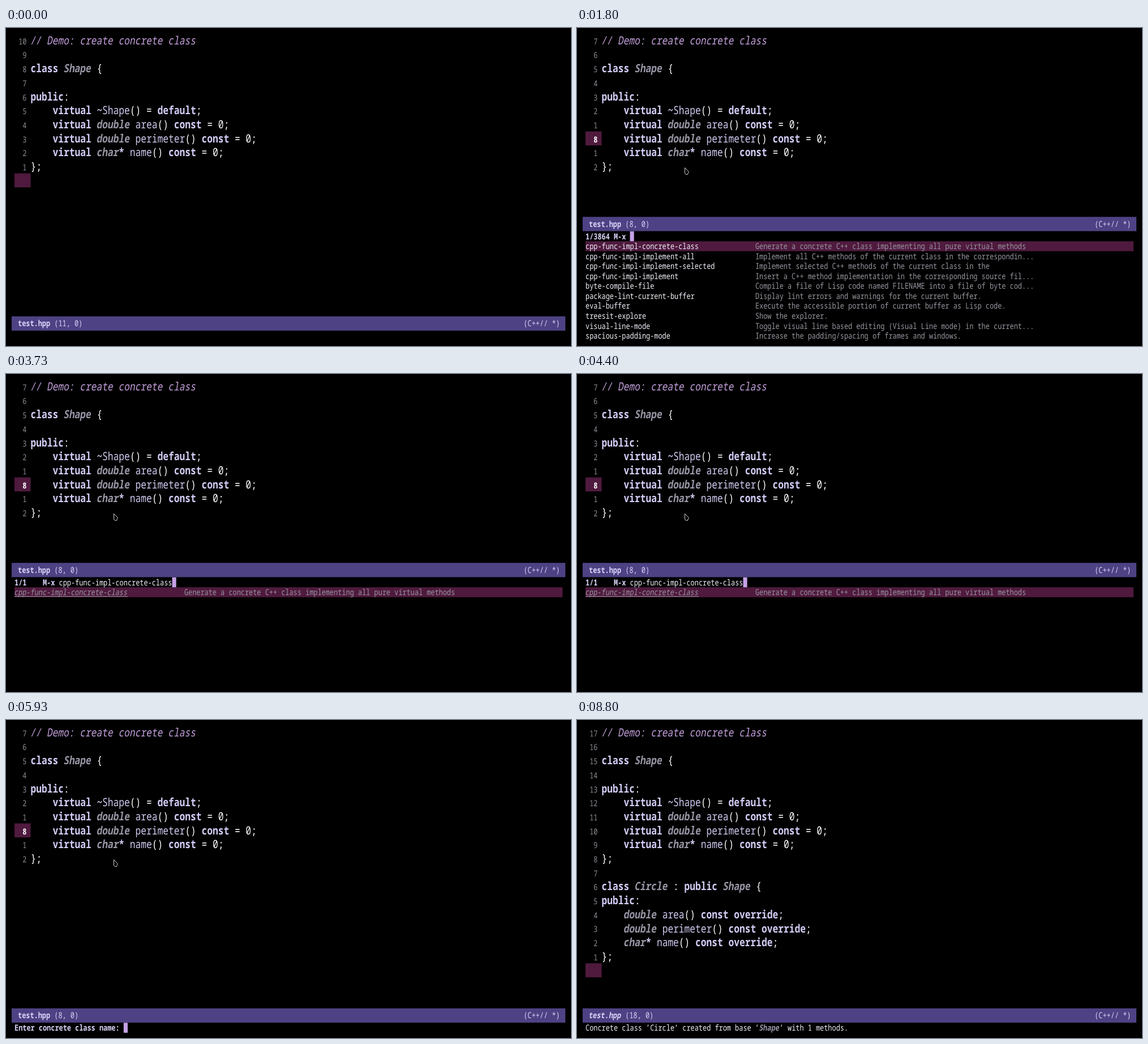
An HTML page for the animation above (9.87 s loop, 998 px wide and 561 px high).

```html
<!DOCTYPE html>
<html lang="en">
<head>
<meta charset="utf-8">
<title>Create concrete class</title>
<style>
  html, body { margin: 0; width: 100%; height: 100%; overflow: hidden; background: #000; }
  svg { display: block; width: 998px; height: 561px; }
  text {
    font-family: "Noto Sans Mono", "DejaVu Sans Mono", monospace;
    white-space: pre; text-rendering: geometricPrecision; fill: #f2f0fa;
  }
  .code { font-size: 20px; }
  .small { font-size: 14.66px; }
  .comment { fill: #c4a0dc; }
  .keyword { fill: #d2cdf6; font-weight: 600; }
  .type { fill: #9996a6; font-weight: 600; }
  .name { fill: #cfcbf0; }
  .sign { fill: #fff; font-weight: 500; }
  .number { fill: #8e8c96; }
  .current { fill: #fff; font-weight: 700; }
  .mode { fill: #d9d4f8; }
  .bold { font-weight: 600; }
  .prompt { fill: #d6d1f6; font-weight: 600; }
  .doc, .used { fill: #98959f; }
  .under { fill: #000; }
</style>
</head>
<body>
<svg id="stage" viewBox="0 0 998 561"></svg>
<script>
const LOOP = 9870;
const ASPECT = 0.8117;                 // the typeface is condensed throughout
const SLANT = 9.4, SLANTED = /comment|type|used|italic/;
const WIDTH = { code: 9.74, small: 7.14 };
const CODE_X = 43.5, MINI_X = 15;
const LINE_H = 24.68, MINI_H = 17.55;
const WINE = '#4f1a3e', CURSOR = '#c5a2e9', BAR = '#4e4284';

const stage = document.getElementById('stage');
const layers = [];

const lineTop = row => 9.7 + LINE_H * (row - 1);
const miniTop = row => 358.7 + MINI_H * row;

const rect = (x, y, w, h, fill) =>
  `<rect x="${x}" y="${y}" width="${w}" height="${h}" fill="${fill}"/>`;

// Sets runs of [string, class] one after another on the character grid.
function text(size, x, y, runs) {
  let out = '';
  for (const [s, cls = ''] of runs) {
    const slant = SLANTED.test(cls);
    const skew = slant ? `skewX(${-SLANT})` : '';
    out += `<text class="${size} ${cls}" transform="translate(${x - (slant ? 0.8 : 0)} ${y}) ` +
      `${skew} scale(${ASPECT} 1)">${s}</text>`;
    x += s.length * WIDTH[size];
  }
  return out;
}

const small = (x, y, ...runs) => text('small', x, y, runs);
const miniAt = (row, col, ...runs) =>
  small(MINI_X + col * WIDTH.small, miniTop(row) + 13.9, ...runs);
const mini = (row, ...runs) => miniAt(row, 0, ...runs);
const miniCursor = (row, col) =>
  rect(MINI_X + col * WIDTH.small, miniTop(row), WIDTH.small, MINI_H, CURSOR);

function layer(from, to, markup) {
  const g = document.createElementNS('http://www.w3.org/2000/svg', 'g');
  g.innerHTML = markup;
  stage.append(g);
  layers.push({ g, from, to });
  return g;
}

function wordClass(word, before) {
  if (/^(class|public|virtual|default|const|override|\*|~)$/.test(word)) return 'keyword';
  if (/^(double|char|Shape|Circle)$/.test(word) && before !== '~') return 'type';
  return /^[a-z]/i.test(word) ? 'name' : 'sign';
}

function highlight(line) {
  if (line.startsWith('//')) return [[line, 'comment']];
  const words = line.match(/\w+|[~*]|[^\w~*]+/g) || [];
  return words.map((word, i) => [word, wordClass(word, words[i - 1])]);
}

const codeLines = (lines, first) => lines.map((line, i) =>
  text('code', CODE_X, lineTop(first + i) + 19.3, highlight(line))).join('');

const base = `// Demo: create concrete class

class Shape {

public:
    virtual ~Shape() = default;
    virtual double area() const = 0;
    virtual double perimeter() const = 0;
    virtual char* name() const = 0;
};`.split('\n');

const derived = `class Circle : public Shape {
public:
    double area() const override;
    double perimeter() const override;
    char* name() const override;
};`.split('\n');

function gutter(current, rows) {
  let out = rect(MINI_X, lineTop(current), 28.5, LINE_H, WINE);
  for (let row = 1; row <= rows; row++) {
    const here = row === current;
    const label = String(here ? row : Math.abs(row - current));
    out += small(36.5 - label.length * WIDTH.small, lineTop(row) + 19.1,
      [label, here ? 'current' : 'number']);
  }
  return out;
}

function modeLine(top, row, modified) {
  const y = top + 17.7;
  return rect(10, top, 978, 25.2, BAR) +
    small(21, y, ['test.hpp', 'mode bold' + (modified ? ' italic' : '')], [` (${row}, 0)`, 'mode']) +
    small(914.2, y, ['(C++// *)', 'mode']);
}

const LOW = 508.7, HIGH = 333.2;
const OPEN = 1800, PICK = 3670, ASK = 4470, DONE = 6800;

// from, to, current line, mode line top
[
  [0, 1200, 11, LOW],
  [1200, 1330, 10, LOW],
  [1330, 1470, 9, LOW],
  [1470, OPEN, 8, LOW],
  [OPEN, ASK, 8, HIGH],
  [ASK, DONE, 8, LOW],
  [DONE, LOOP, 18, LOW]
].forEach(([from, to, row, top]) =>
  layer(from, to, gutter(row, from < DONE ? 10 : 17) + modeLine(top, row, from >= DONE)));

layer(0, LOOP, codeLines(base, 1));
layer(DONE, LOOP, codeLines(derived, 12));

// from, to, line of the text cursor
[
  [200, 1200, 11], [1200, 1330, 10], [1330, 1470, 9], [1470, OPEN, 8], [DONE, 8470, 18]
].forEach(([from, to, row]) => layer(from, to,
  rect(CODE_X, lineTop(row), WIDTH.code, LINE_H, CURSOR) +
  (row === 10 ? text('code', CODE_X, lineTop(row) + 19.3, [['}', 'under']]) : '')));

const commands = [
  ['cpp-func-impl-concrete-class', 'Generate a concrete C++ class implementing all pure virtual methods'],
  ['cpp-func-impl-implement-all', 'Implement all C++ methods of the current class in the correspondin...'],
  ['cpp-func-impl-implement-selected', 'Implement selected C++ methods of the current class in the'],
  ['cpp-func-impl-implement', 'Insert a C++ method implementation in the corresponding source fil...'],
  ['byte-compile-file', 'Compile a file of Lisp code named FILENAME into a file of byte cod...'],
  ['package-lint-current-buffer', 'Display lint errors and warnings for the current buffer.'],
  ['eval-buffer', 'Execute the accessible portion of current buffer as Lisp code.'],
  ['treesit-explore', 'Show the explorer.'],
  ['visual-line-mode', 'Toggle visual line based editing (Visual Line mode) in the current...'],
  ['spacious-padding-mode', 'Increase the padding/spacing of frames and windows.']
];
const chosen = commands[0][0];
const selection = rect(MINI_X, miniTop(1), 968, MINI_H, WINE);
const doc = i => miniAt(i + 1, 42, [commands[i][1], 'doc']);

layer(OPEN, PICK, selection + mini(0, ['1/3864 M-x ', 'prompt']) + miniCursor(0, 11) +
  commands.map(([name], i) => mini(i + 1, [name]) + doc(i)).join(''));

layer(PICK, ASK, selection + mini(0, ['1/1    M-x ', 'prompt'], [chosen]) +
  miniCursor(0, 11 + chosen.length) + mini(1, [chosen, 'used']) +
  rect(MINI_X, miniTop(1) + 15.7, chosen.length * WIDTH.small, 1, '#98959f') + doc(0));

const question = 'Enter concrete class name: ';
const keyTimes = [ASK, 6000, 6130, 6200, 6330, 6400, 6530, DONE];
for (let n = 0; n <= 6; n++) {
  layer(keyTimes[n], keyTimes[n + 1],
    mini(10, [question, 'prompt'], ['Circle'.slice(0, n)]) + miniCursor(10, question.length + n));
}

layer(DONE, LOOP, mini(10,
  ['Concrete class ’Circle’ created from base ’'], ['Shape', 'type'], ['’ with 1 methods.']));

const pointer = layer(70, 6000,
  '<path d="M.5 .5V10.5L3 12.5H5.2L7.3 7.5Z" fill="#000" stroke="#d0d0d4" stroke-linejoin="round"/>');

function movePointer(t) {
  const left = (1 - Math.min(1, Math.max(0, (t - 70) / 400))) ** 2;
  pointer.setAttribute('transform', `translate(${190 + 178 * left} ${246 + 58 * left})`);
}

const start = performance.now();
function draw() {
  const t = (performance.now() - start) % LOOP;
  for (const { g, from, to } of layers) {
    g.style.display = t >= from && t < to ? '' : 'none';
  }
  movePointer(t);
  requestAnimationFrame(draw);
}
draw();
</script>
</body>
</html>
```
